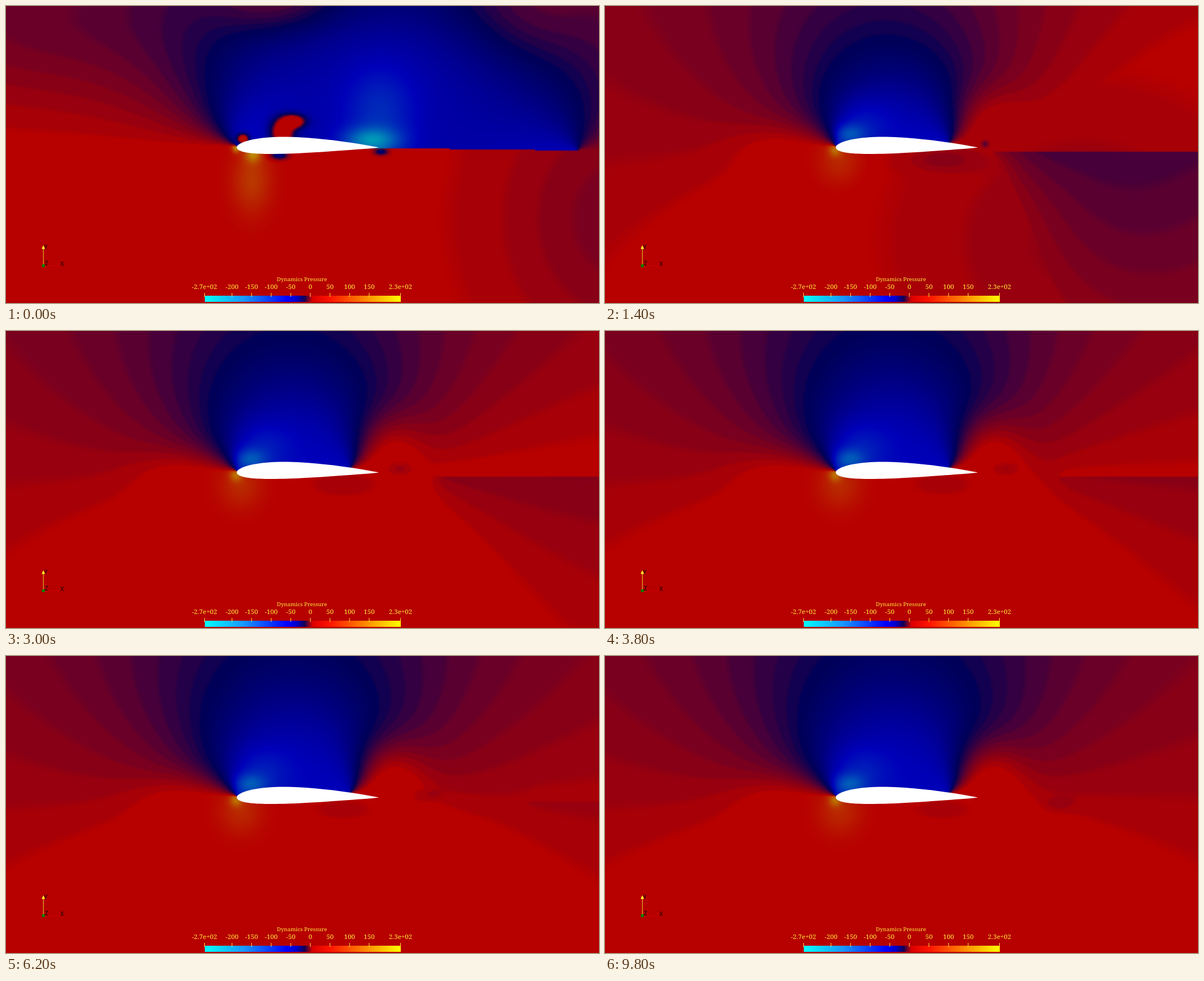
An HTML page with a canvas that plays this animation: 1056 by 530 pixels, repeating every 10 s.

```html
<!DOCTYPE html>
<html lang="en">
<head>
<meta charset="utf-8">
<title>Dynamics Pressure</title>
<style>
  html, body { margin: 0; width: 100%; height: 100%; overflow: hidden; background: #b70000; }
  canvas, svg { position: absolute; left: 0; top: 0; width: 1056px; height: 530px; }
  .legend text { font: 11.6px "Noto Serif", serif; fill: #ffeb3c; text-anchor: middle; }
  .legend .title { font-size: 9.8px; }
  .axes text { font: 10.5px "Open Sans", sans-serif; fill: #000; }
</style>
</head>
<body>
<canvas id="field" width="528" height="265"></canvas>
<svg viewBox="0 0 1056 530">
  <defs>
    <linearGradient id="bar">
      <stop offset="0" stop-color="#0ff"/>
      <stop offset=".2" stop-color="#1996ff"/>
      <stop offset=".42" stop-color="#00f"/>
      <stop offset=".47" stop-color="#0000c8"/>
      <stop offset=".51" stop-color="#140050"/>
      <stop offset=".55" stop-color="#dc0000"/>
      <stop offset=".64" stop-color="#ff1400"/>
      <stop offset="1" stop-color="#ff0"/>
    </linearGradient>
  </defs>
  <path id="wing" fill="#fff"/>
  <g class="axes">
    <path d="M66.5 463V432" stroke="#e6c828"/>
    <path d="M66 463.5H96" stroke="#d40000"/>
    <path d="M66.5 427L69.5 433.5H63.5Z" fill="#ffff28"/>
    <rect x="64" y="461" width="5" height="5" fill="#008000"/>
    <text x="68" y="434">Y</text>
    <text x="97" y="464">X</text>
    <text x="69" y="463">Z</text>
  </g>
  <g class="legend" id="legend">
    <rect x="354" y="517" width="349" height="11" fill="url(#bar)"/>
    <text class="title" x="527" y="491">Dynamics Pressure</text>
  </g>
</svg>
<script>
const W = 528, H = 265, LOOP = 10000, STEP = 200, SETTLE = 1400, DEG = 180 / Math.PI;
const NOSE = 411, TAIL = 663, CHORD_Y = 252.5;
const ctx = document.getElementById('field').getContext('2d');
const image = ctx.createImageData(W, H);

const clamp = (v, lo, hi) => v < lo ? lo : v > hi ? hi : v;
const mix = (a, b, u) => a + (b - a) * u;
const smooth = u => (u = clamp(u, 0, 1), u * u * (3 - 2 * u));

// Legend labels
const legend = document.getElementById('legend');
function label(value, text) {
  const x = 542 + value * .698;
  legend.insertAdjacentHTML('beforeend',
    `<text x="${x}" y="505">${text}</text><path d="M${x} 512V519" stroke="#ffeb3c"/>`);
}
for (let v = -200; v <= 150; v += 50) label(v, v);
label(-270, '-2.7e+02');
label(230, '2.3e+02');

// Four-digit wing section: 12 % thick, slightly cambered
function wingPoint(x, side) {
  const thick = .6 * (.2969 * Math.sqrt(x) - .126 * x - .3516 * x ** 2 + .2843 * x ** 3 - .1015 * x ** 4);
  const camber = .016 * (x < .4 ? (.8 * x - x * x) / .16 : (.2 + .8 * x - x * x) / .36);
  const c = TAIL - NOSE;
  return [NOSE + c * x, CHORD_Y - c * (camber + side * thick)].map(n => n.toFixed(1)).join(' ');
}
const outline = [];
for (let i = -40; i <= 40; i++) outline.push(wingPoint((i / 40) ** 2, Math.sign(i)));
document.getElementById('wing').setAttribute('d', `M${outline.join('L')}Z`);

// Level 0 is navy, 1 is red; below is blue to cyan, above is orange to yellow.
const ramp = [[-3, 0, 184, 184], [-1, 0, 0, 185], [0, 0, 0, 88], [.5, 98, 0, 45],
  [.75, 140, 0, 20], [1, 183, 0, 0], [2, 190, 184, 0]];

// Lookup table over levels -3 to 2, with soft bands between navy and red
const N = 2000;
const colors = Array.from({ length: N + 1 }, (_, i) => {
  let v = i / N * 5 - 3;
  if (v > 0 && v < 1) {
    const u = v * 11, n = Math.floor(u);
    v = (n + clamp((u - n - .5) * 4 + .5, 0, 1)) / 11;
  }
  let j = 1;
  while (j < ramp.length - 1 && ramp[j][0] < v) j++;
  const a = ramp[j - 1], b = ramp[j], u = (v - a[0]) / (b[0] - a[0]);
  return [1, 2, 3].map(c => mix(a[c], b[c], u));
});

// Signed angle, in degrees, under which the segment is seen from a point
function sheet(x, y, x1, y1, x2, y2) {
  const ax = x1 - x, ay = y1 - y, bx = x2 - x, by = y2 - y;
  return Math.atan2(ay * bx - ax * by, ax * bx + ay * by) * DEG;
}

function spot(x, y, cx, cy, rx, ry) {
  const dx = (x - cx) / rx, dy = (y - cy) / ry, q = dx * dx + dy * dy;
  return q < 12 ? Math.exp(-q / 2) : 0;
}

// Base level, then extra suction where it is cold, patches, and heat where it is red
function level(base, cold, patch, hot) {
  let v = base < 0 ? -Math.tanh(-1.1 * base) : Math.min(base, 1);
  v = clamp(v - cold * clamp(-2 * v, 0, 1) + patch, -3, 1);
  return v + hot * clamp(v, 0, 1);
}

function startLevel(x, y) {
  const at = (...shape) => spot(x, y, ...shape);
  const base = 1.02 - .0105 * sheet(x, y, NOSE, 250, 1018, 258)
    - .016 * sheet(x, y, NOSE, 250, 490, 247)
    - .5 * at(690, 120, 120, 80) + .55 * at(490, -10, 80, 45) + .35 * at(920, 10, 90, 70);
  const cold = 1.4 * at(650, 240, 35, 16) + .65 * at(665, 195, 45, 60);
  const patch = 3 * (at(492, 225, 14, 16) + at(512, 206, 14, 8) + at(422, 237, 7, 6))
    - 1.6 * at(487, 266, 10, 5) - 1.3 * at(668, 260, 8, 4)
    - .38 * at(1100, 380, 150, 170) - .22 * at(0, 50, 180, 80);
  const hot = .6 * at(440, 263, 10, 11) + .3 * at(438, 310, 24, 42) + .7 * at(410, 253, 5, 6);
  return level(base, cold, patch, hot);
}

function settledLevel(x, y, t) {
  const at = (...shape) => spot(x, y, ...shape);
  const age = Math.max(t - SETTLE, 0);
  const rest = Math.exp(-age / 2000), shade = rest ** 3;
  const base = .85 - (.0218 - .0056 * rest) * sheet(x, y, NOSE, 250, 612, 246)
    + .0022 * rest * sheet(x, y, 690 + age * .05, 259, 1300, 262)
    + (.65 - .2 * rest) * at(670, 212, 48, 48) + .22 * at(330, 250, 70, 30);
  const cold = .8 * at(434, 229, 20, 13) + .35 * at(455, 207, 36, 32);
  const eddyY = 246 + 18 * smooth((t - 5500) / 3000);
  const patch = -(.13 + .37 * shade) * at(677 + age * .0155, eddyY, 18 - 14 * rest, 8 - 4 * rest)
    - (.08 + .15 * shade) * at(600, 274, 40, 14)
    - .25 * shade * at(850, 420, 190, 160);
  const hot = .45 * at(410, 257, 8, 8) + .22 * at(418, 275, 27, 30);
  return level(base, cold, patch, hot);
}

function draw(t) {
  const early = clamp(1 - t / SETTLE, 0, 1) ** 2;
  const data = image.data;
  for (let j = 0, p = 0; j < H; j++) {
    for (let i = 0; i < W; i++, p += 4) {
      const x = i * 2 + 1, y = j * 2 + 1;
      let v = early < 1 ? settledLevel(x, y, t) : 0;
      if (early > 0) v = mix(v, startLevel(x, y), early);
      const c = colors[Math.round((clamp(v, -3, 2) + 3) / 5 * N)];
      data[p] = c[0];
      data[p + 1] = c[1];
      data[p + 2] = c[2];
      data[p + 3] = 255;
    }
  }
  ctx.putImageData(image, 0, 0);
}

let shown = -1;
function tick() {
  const step = Math.floor(performance.now() % LOOP / STEP);
  if (step !== shown) draw((shown = step) * STEP);
  requestAnimationFrame(tick);
}
tick();
</script>
</body>
</html>
```
